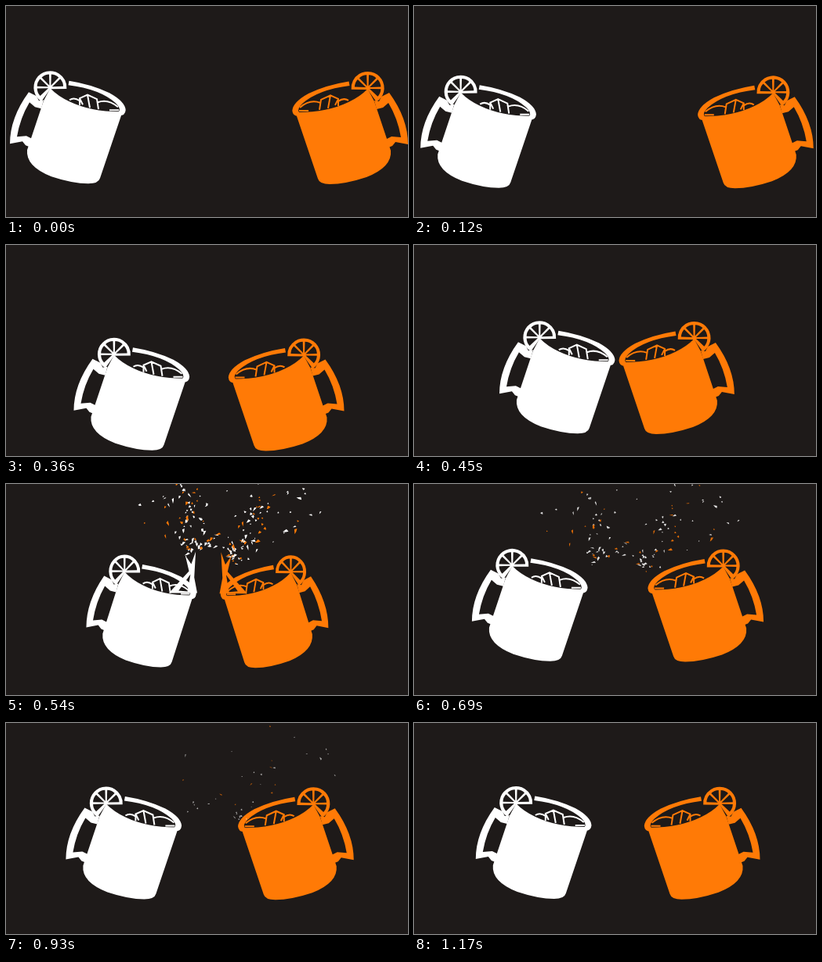
These frames come from a looping animation (513 by 270 pixels, 1.2 s). An HTML page with a canvas:

```html
<!DOCTYPE html>
<html lang="en">
<head>
<meta charset="utf-8">
<title>Cheers</title>
<style>
html, body { margin: 0; width: 100%; height: 100%; overflow: hidden; background: #1e1a19; }
canvas { display: block; }
</style>
</head>
<body>
<canvas id="stage" width="513" height="270"></canvas>
<script>
const ctx = document.getElementById('stage').getContext('2d');
const DARK = '#1e1a19', WHITE = '#fff', ORANGE = '#ff7a06';
const LOOP = 1200, STEP = 30, HIT = 455, PEAK = 540;

const body = new Path2D('M56.5 105 Q66 115 81 122 Q108 135 145 135 L147 140 L120 220 Q118 227 105 227 Q85 227 58 218 Q25 205 27 184 L48 121Z');
const rim = new Path2D('M80.500 95.500 Q109 100 132 111 Q152 122 152.700 133 Q152 140 145 140 L138 137 L144 135 Q147 131 140 124 Q120 106 79.500 101Z');
const handle = new Path2D('M29 110 L39 115 L42 121 L48 120 L45 131 L37 129 L30 123 Q18 143 14 167 L26 166 L34 170 L30 180 L25 178 L21 173 L5 176 Q5 143 29 110Z');
const ice = new Path2D('M81 120 Q87 116 94 121 M94 127 V118 L104 113.500 L116 119 L118 132 M94 118 L98 126 M104 113.500 L107 130 M117 123 Q130 118 143 129 M132 133 H144');
const flare = new Path2D('M116 132 L143 104 L138 84 L146 95 L152 79 L150 112 L154 132Z M129 129 L145 108 L141 130Z');

const mugs = [
  { color: WHITE, rest: 69, drift: 4.8, shove: 0 },
  { color: ORANGE, rest: 67, drift: 4.5, shove: 4.5 }
];

const clamp = k => Math.max(0, Math.min(1, k));
const ease = k => (1 - Math.cos(Math.PI * clamp(k))) / 2;
const bell = (t, center, width) => Math.exp(-(((t - center) / width) ** 2));

// swing down and in, collide, bounce back, then creep towards each other
function pose(mug, t) {
  const impact = bell(t, PEAK, 50);
  const swing = 104 * ease(clamp(t / 450) ** 1.65);
  const settled = mug.rest + mug.drift * (t - 690) / 480;
  return {
    x: swing + (settled - swing) * ease((t - 515) / 90) - 5 * bell(t, 620, 35) + mug.shove * impact,
    y: 41 * bell(t, 310, 135) + 5.3 * impact - 2 * ease((t - 600) / 500),
    squash: 1 - (.05 + mug.shove * .004) * impact
  };
}

let seed = 11;
const random = () => (seed = seed * 16807 % 2147483647) / 2147483647;
const spread = r => (random() + random() - 1) * r;

// droplets fly up in a steep left plume and a longer right one
const drops = Array.from({ length: 190 }, (_, i) => {
  const right = i % 2;
  const angle = right ? -.82 + spread(.4) : -1.85 + spread(.6);
  const reach = 42 + (right ? 140 : 90) * random() ** 1.5;
  return {
    x: Math.cos(angle) * reach,
    y: Math.sin(angle) * reach,
    length: 2 + 6 * random() ** 2,
    width: .7 + 1.7 * random(),
    angle: spread(1.6) - .8,
    life: 570 + 500 * random() ** 1.3,
    color: random() < .32 ? ORANGE : WHITE
  };
});

function drawLime(color) {
  const rad = Math.PI / 180, cx = 56.4, cy = 104;
  ctx.fillStyle = color;
  ctx.beginPath();
  ctx.moveTo(cx, cy + 2);
  ctx.arc(cx, cy, 21, 122 * rad, 365 * rad);
  ctx.fill();
  ctx.fillStyle = DARK;
  for (let a = 157.5; a < 360; a += 45) {
    const x = cx + 2.6 * Math.cos(a * rad), y = cy + 2.6 * Math.sin(a * rad);
    ctx.beginPath();
    ctx.moveTo(x, y);
    ctx.arc(x, y, 14.3, (a - 21) * rad, (a + 21) * rad);
    ctx.fill();
  }
}

function drawMug(mug, t) {
  const { x, y, squash } = pose(mug, t);
  ctx.translate(x + 5, y);
  ctx.scale(squash, 1);
  ctx.translate(-5, 0);
  ctx.fillStyle = ctx.strokeStyle = mug.color;
  ctx.lineWidth = 2;
  for (const part of [handle, rim, body]) ctx.fill(part);
  ctx.stroke(ice);
  drawLime(mug.color);

  const height = Math.min(clamp((t - HIT) / 70), clamp((640 - t) / 90));
  ctx.translate(0, 132 * (1 - height));
  ctx.scale(1, height);
  ctx.fillStyle = mug.color;
  if (height) ctx.fill(flare, 'evenodd');
}

function drawSplash(t) {
  if (t <= HIT) return;
  const burst = 1 - (1 - clamp((t - HIT) / (PEAK - HIT))) ** 2;
  const after = Math.max(0, t - PEAK);
  const size = 1 - after / 1000;
  ctx.globalAlpha = 1 - after / 1100;
  for (const d of drops) {
    if (t > d.life) continue;
    ctx.save();
    ctx.translate(257 + d.x * burst * (1 + after * .0006), 125 + d.y * burst + after * .07);
    ctx.rotate(d.angle + after * .002);
    ctx.scale(size, size);
    ctx.fillStyle = d.color;
    ctx.beginPath();
    ctx.moveTo(-d.length / 2, 0);
    ctx.lineTo(d.length / 4, -d.width);
    ctx.lineTo(d.length / 2, d.width / 2);
    ctx.lineTo(0, d.width / 2);
    ctx.fill();
    ctx.restore();
  }
  ctx.globalAlpha = 1;
}

function frame(now) {
  const t = Math.floor(now % LOOP / STEP) * STEP;
  ctx.fillStyle = DARK;
  ctx.fillRect(0, 0, 513, 270);
  mugs.forEach((mug, i) => {
    ctx.save();
    if (i) ctx.transform(-1, 0, 0, 1, 518, .7);
    drawMug(mug, t);
    ctx.restore();
  });
  drawSplash(t);
  requestAnimationFrame(frame);
}
requestAnimationFrame(frame);
</script>
</body>
</html>
```
